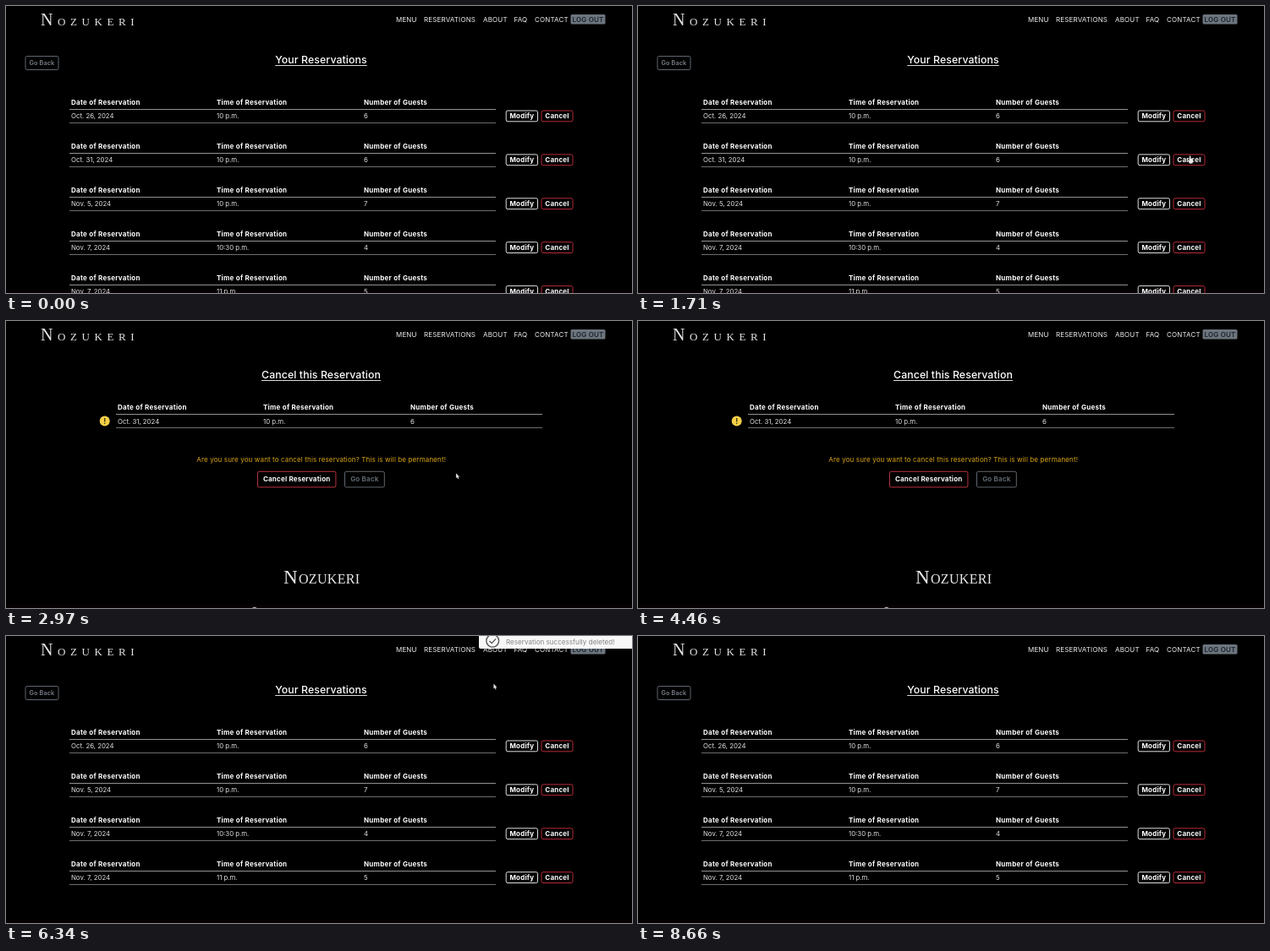
Recreate the animation shown at these times as an HTML page with a canvas. Size 740 px wide and 340 px high, loop 8680 ms.

```html
<!DOCTYPE html>
<html lang="en">
<head>
<meta charset="utf-8">
<title>Reservations</title>
<style>
html, body { margin: 0; width: 100%; height: 100%; overflow: hidden; background: #000; }
canvas { display: block; }
</style>
</head>
<body>
<canvas id="stage" width="740" height="340"></canvas>
<script>
const ctx = document.getElementById('stage').getContext('2d');
const LOOP = 8680;
const SANS = 'Montserrat, Inter, sans-serif';
const SERIF = '"Liberation Serif", serif';
const GREY = '#6c757d';
const DIM = '#5f676e';

const bookings = [
  ['Oct. 26, 2024', '10 p.m.', '6'],
  ['Oct. 31, 2024', '10 p.m.', '6'],
  ['Nov. 5, 2024', '10 p.m.', '7'],
  ['Nov. 7, 2024', '10:30 p.m.', '4'],
  ['Nov. 7, 2024', '11 p.m.', '5']
];
const remaining = bookings.filter((_, i) => i !== 1);

function text(str, x, y, { size = 8, weight = 400, color = '#fff', gap = 0, align = 'left', font = SANS } = {}) {
  ctx.font = `${weight} ${size}px ${font}`;
  ctx.letterSpacing = gap + 'px';
  ctx.textAlign = align;
  ctx.fillStyle = color;
  ctx.fillText(str, x, y);
  return ctx.measureText(str).width;
}

function line(x1, x2, y, color) {
  ctx.fillStyle = color;
  ctx.fillRect(x1, y, x2 - x1, 1);
}

function box(x, y, w, h, r) {
  ctx.beginPath();
  ctx.roundRect(x, y, w, h, r);
}

function disc(x, y, r) {
  ctx.beginPath();
  ctx.arc(x, y, r, 0, Math.PI * 2);
}

function button(label, x, y, w, h, border, color = '#fff', size = 8) {
  box(x, y, w, h, 1.8);
  ctx.strokeStyle = border;
  ctx.lineWidth = 1;
  ctx.stroke();
  text(label, x + w / 2, y + h / 2 + 2.8, { size, weight: 700, color, gap: 0.2, align: 'center' });
}

function title(str) {
  const w = text(str, 372.5, 67.5, { size: 12.3, weight: 500, gap: 0.1, align: 'center' });
  line(372.5 - w / 2, 372.5 + w / 2, 70, '#d8d8d8');
}

function header() {
  text('N', 41, 22.5, { size: 20, color: '#e4e4e4', font: SERIF });
  text('OZUKERI', 61, 22.5, { size: 13, color: '#e4e4e4', gap: 5.6, font: SERIF });
  const links = [['MENU', 461], ['RESERVATIONS', 494], ['ABOUT', 564], ['FAQ', 600.5], ['CONTACT', 625]];
  for (const [label, x] of links) text(label, x, 18.7, { gap: 0.15, color: '#f0f0f0' });
  box(667.5, 10, 41, 11.6, 1.5);
  ctx.fillStyle = GREY;
  ctx.fill();
  text('LOG OUT', 688, 18.7, { weight: 600, color: '#1c242d', gap: 0.15, align: 'center' });
}

function booking(values, x, y) {
  const labels = ['Date of Reservation', 'Time of Reservation', 'Number of Guests'];
  [2, 174, 348].forEach((dx, i) => {
    text(labels[i], x + dx, y, { weight: 700, gap: 0.26 });
    text(values[i], x + dx, y + 16.2, { size: 7.8, color: '#e2e2e2' });
  });
  line(x, x + 504, Math.round(y + 5), '#929292');
  line(x, x + 504, Math.floor(y + 21.3), '#6e6e6e');
}

function listPage(items) {
  button('Go Back', 23, 59.5, 39, 16, DIM, GREY, 7.1);
  title('Your Reservations');
  items.forEach((item, i) => {
    const y = 117 + i * 51.9;
    booking(item, 75, y);
    button('Modify', 591.2, y + 7, 37.3, 12.8, '#e0e0e0');
    button('Cancel', 633, y + 7, 37, 12.8, '#b52b38');
  });
}

function confirmPage() {
  title('Cancel this Reservation');
  booking(bookings[1], 130, 105.4);
  disc(116.7, 118.5, 6);
  ctx.fillStyle = '#f3cf45';
  ctx.fill();
  ctx.fillStyle = '#16130a';
  ctx.fillRect(116.2, 115, 1.1, 4.4);
  ctx.fillRect(116.2, 120.6, 1.1, 1.3);
  text('Are you sure you want to cancel this reservation? This is will be permanent!',
    372.7, 166.6, { color: '#dca616', gap: 0.13, align: 'center' });
  button('Cancel Reservation', 297.5, 178.3, 92.4, 18.6, '#b8323e');
  button('Go Back', 400.5, 178.3, 46.8, 18.6, DIM, DIM);
  text('N', 328, 311.3, { size: 23, color: '#e8e8e8', font: SERIF });
  text('OZUKERI', 346, 311.3, { size: 16, color: '#e8e8e8', gap: 0.3, font: SERIF });
}

function toast() {
  box(559, -6, 190, 21, 2);
  ctx.fillStyle = '#f8f8f8';
  ctx.fill();
  ctx.strokeStyle = '#505050';
  ctx.lineWidth = 1.3;
  disc(575.2, 5.8, 7.4);
  ctx.stroke();
  ctx.beginPath();
  ctx.moveTo(571.6, 6);
  ctx.lineTo(574.2, 8.6);
  ctx.lineTo(579, 3.4);
  ctx.stroke();
  text('Reservation successfully deleted!', 591, 9.6, { size: 8.1, color: '#858585' });
}

function pointer(x, y, hand) {
  const arrow = [[0, 0], [0, 5.6], [1.2, 4.6], [2.1, 6.6], [3, 6.2], [2.2, 4.3], [3.8, 4.2]];
  const fist = [[0, 0], [1.2, 0], [1.4, 3], [4, 3.8], [4.2, 6.5], [3.2, 9], [0, 9], [-2.2, 5.6], [-1.6, 4.8], [-0.2, 5.8]];
  ctx.beginPath();
  for (const [dx, dy] of hand ? fist : arrow) ctx.lineTo(x + dx, y + dy);
  ctx.closePath();
  ctx.strokeStyle = '#333';
  ctx.lineWidth = 0.8;
  ctx.stroke();
  ctx.fillStyle = '#e8e8e8';
  ctx.fill();
}

// Each move: start, end, from, to, easing power
const moves = [
  [100, 910, [540, 250], [618, 204], 1.6],
  [1030, 1710, [618, 204], [652, 177.5], 1.8],
  [2760, 3500, [652, 177.5], [349, 185], 1.5],
  [5960, 6720, [349, 185], [677, 0], 1.7]
];

function cursor(t) {
  if (t < 100 || (t >= 4460 && t < 5990) || t >= 8200) return;
  const [start, end, from, to, power] = moves.filter(m => t >= m[0]).pop();
  const p = Math.min(1, (t - start) / (end - start));
  const k = 1 - Math.pow(1 - p, power);
  const x = from[0] + (to[0] - from[0]) * k;
  const y = from[1] + (to[1] - from[1]) * k;
  const overCancel = t < 2360 && x > 633 && y > 174;
  const overConfirm = t >= 2760 && t < 4460 && x < 390;
  pointer(x, y, overCancel || overConfirm || (t > 6600 && y < 15));
}

function draw(t) {
  ctx.fillStyle = '#000';
  ctx.fillRect(0, 0, 740, 340);
  ctx.fillStyle = '#080103';
  ctx.fillRect(0, 336, 740, 4);
  header();
  if (t < 2360) listPage(bookings);
  else if (t < 4880) {
    confirmPage();
    disc(293.7, 341.8, 3);
    ctx.fillStyle = '#aaa';
    ctx.fill();
  } else listPage(remaining);
  if (t >= 4880 && t < 8200) toast();
  cursor(t);
}

const begin = performance.now();
function tick() {
  draw((performance.now() - begin) % LOOP);
  requestAnimationFrame(tick);
}
tick();
</script>
</body>
</html>
```
